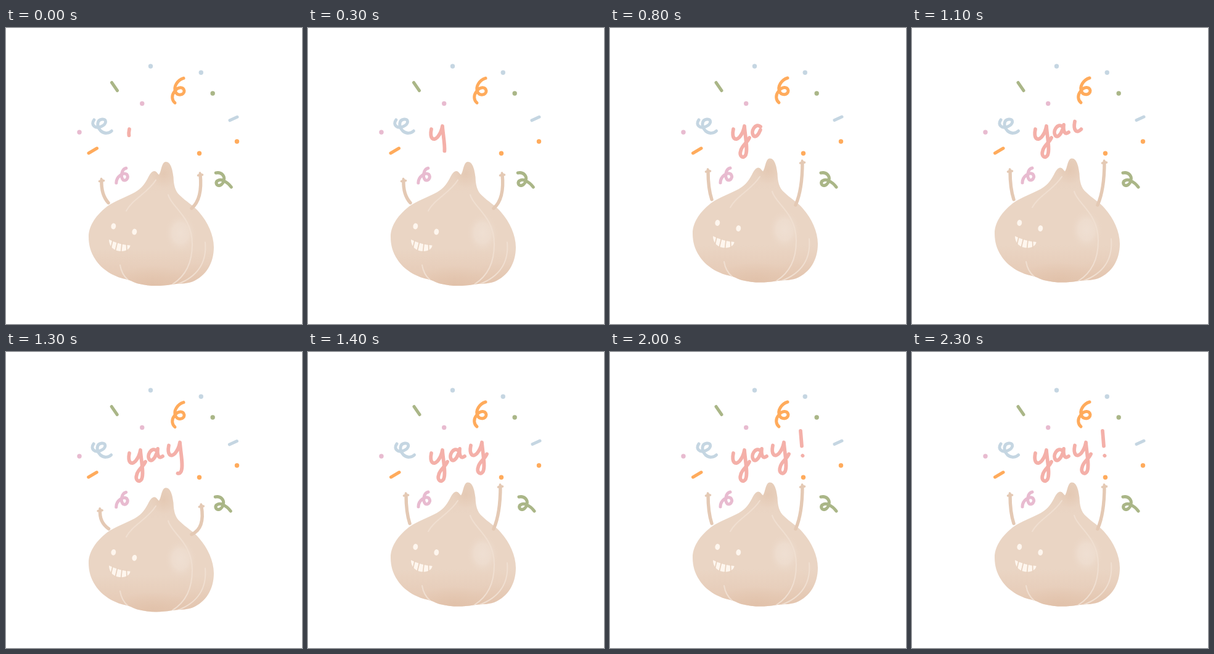
Write an HTML page that moves like this. It is 480 by 480 pixels and loops after 2.4 s.

```html
<!DOCTYPE html>
<html lang="en">
<head>
<meta charset="utf-8">
<title>Yay!</title>
<style>
html, body { margin: 0; width: 100%; height: 100%; overflow: hidden; background: #fff; }
svg { display: block; width: 480px; height: 480px; fill: none; stroke-linecap: round; stroke-linejoin: round; }
#confetti path { stroke-width: 5; }
#word path { stroke: #f4b0a9; stroke-width: 5.8; }
#arms path { stroke: #e4c9b4; stroke-width: 5.4; }
#arms .hand { stroke-width: 3.6; }
.vein { stroke: #f0dfd1; stroke-width: 2; }
</style>
</head>
<body>
<svg viewBox="0 0 480 480">
  <defs>
    <linearGradient id="base" x1="0" y1="0" x2="0" y2="1">
      <stop offset="0" stop-color="#e7cfbc"/>
      <stop offset=".25" stop-color="#ead5c4"/>
      <stop offset=".7" stop-color="#ead5c4"/>
      <stop offset="1" stop-color="#e5c8b3"/>
    </linearGradient>
    <radialGradient id="shade">
      <stop offset="0" stop-color="#dfbea5" stop-opacity=".7"/>
      <stop offset="1" stop-color="#dfbea5" stop-opacity="0"/>
    </radialGradient>
    <radialGradient id="glow">
      <stop offset="0" stop-color="#efdfd2"/>
      <stop offset=".5" stop-color="#efdfd2" stop-opacity=".7"/>
      <stop offset="1" stop-color="#ead5c4" stop-opacity="0"/>
    </radialGradient>
    <path id="bulb" d="M240 226.500C244 226.500 245 230 248 232.500C252 228 252 212 259 211.500C267 211 270 224 271.500 236C272 249 274 259 282 266C292 276 304 282 313 293C327 309 337 330 337 350C337 376 324 397 302 406C291 410 279 408.500 268 410.500C250 413.500 232 413.500 214 409C207 407 201 403 193 401.500C175 398 155 386 145 370C137 358 134 346 134 333C134 316 145 300 159 288C171 277 189 271 204 263.500C218 257 224 249 230 238C233 232 236 227 240 226.500Z"/>
    <clipPath id="clip"><use href="#bulb"/></clipPath>
  </defs>
  <g id="confetti"></g>
  <g id="word"></g>
  <g id="body">
    <use href="#bulb" fill="url(#base)"/>
    <g clip-path="url(#clip)">
      <ellipse cx="238" cy="412" rx="70" ry="32" fill="url(#shade)"/>
      <ellipse cx="310" cy="405" rx="50" ry="30" fill="url(#shade)" opacity=".4"/>
      <ellipse cx="256" cy="231" rx="21" ry="23" fill="url(#shade)" opacity=".6"/>
      <ellipse cx="283" cy="327" rx="27" ry="33" fill="url(#glow)"/>
      <path class="vein" d="M243 241C230 262 205 272 195 291"/>
      <path class="vein" d="M263 265C268 285 302 300 302 345C302 382 286 400 270 410"/>
      <path class="vein" d="M323 342C326 375 310 398 278 410"/>
      <path class="vein" d="M185 379C187 391 192 398 198 403"/>
    </g>
    <g fill="#fef6ee">
      <ellipse cx="174.300" cy="316" rx="3.900" ry="4.900" transform="rotate(10 174.300 316)"/>
      <ellipse cx="208.300" cy="325" rx="3.900" ry="4.900" transform="rotate(10 208.300 325)"/>
      <path d="M167 337.500Q184 346 201.500 347C201 353 194 357 186 356.500C175 356 167 349 167 337.500Z"/>
    </g>
    <path d="M173 339L170.500 350M180.500 342L177.500 355M188 344L186.500 358M195.500 345L196 357" stroke="#e8d1be" stroke-width="1.700"/>
  </g>
  <g id="arms"></g>
</svg>
<script>
const $ = id => document.getElementById(id);
const orange = '#ffab5c', blue = '#c5d6e2', green = '#aab687', pink = '#e8bbd0';

function add(parent, tag, attrs) {
  const el = document.createElementNS('http://www.w3.org/2000/svg', tag);
  for (const key in attrs) el.setAttribute(key, attrs[key]);
  return parent.appendChild(el);
}

const move = (el, x, y) => el.setAttribute('transform', `translate(${x} ${y})`);

const dots = [
  [234.5, 62, blue], [316.3, 72.3, blue], [335.2, 106, green], [220.7, 122.5, pink],
  [119, 169, pink], [374.5, 184, orange], [313.5, 203.2, orange]
];
for (const [cx, cy, fill] of dots) add($('confetti'), 'circle', { cx, cy, r: 3.7, fill });

// Path, colour and drift per unit of crouch
const ribbons = [
  ['M172 88.500L181 101.500', green, -.5, 0],
  ['M364 149.500L376 144', blue, -1, .3],
  ['M134.500 203L148 195', orange, -.5, 0],
  ['M288 81C278 84 271 95 275 103C278 110 289 109 289 101.500C288 94 278 95 273 103C268 109 269 117 274 121', orange, 0, .4],
  ['M144 149C138 157 146 164 155 160C165 156 165 147 157 148C148 149 148 160 155 167C161 172 168 171 172.500 167', blue, -1.2, 0],
  ['M195 227C187 229 186 241 190 246C195 249 200 242 196 237C191 233 179 240 179 251', pink, -.2, .3],
  ['M342 235C351 233 357 240 355 247C353 255 346 258 343 253C341 247 349 245 354 247.500C360 250 364 254 367 258', green, -1.7, 0]
].map(([d, stroke, dx, dy]) => ({ el: add($('confetti'), 'path', { d, stroke }), dx, dy }));

// Path, the steps at which drawing starts and ends, and an offset
const y = 'M200 164C197 179 203 184 210 177C215 171 217 165 218 159C219 175 224 197 220 206C216 213 209 208 212 199C214 190 222 187 226 178';
const strokes = [
  [y, -.4, 5, 0, 0],
  ['M244 160C236 153 227 168 233 175C239 179 245 165 246 157C245 168 248 174 254 169', 5, 10, 0, 0],
  [y, 10.3, 14, 64, -12.5],
  ['M309 128L311 152.500', 14, 17, 0, 0],
  ['M312.300 168L312.500 168.200', 17, 18, 0, 0]
].map(([d, from, to, dx, dy]) => {
  const el = add($('word'), 'path', { d, pathLength: 1 });
  move(el, dx, dy);
  return { el, from, to };
});

const makeArm = () => ({
  limb: add($('arms'), 'path', {}),
  hand: add($('arms'), 'path', { class: 'hand', d: 'M-3.500 1.500L3.500 .5M0 0L-.5 -2.500' })
});
const left = makeArm(), right = makeArm();

// From shoulder through bend to wrist
function drawArm({ limb, hand }, sx, sy, bx, by, x, y) {
  limb.setAttribute('d', `M${sx} ${sy}Q${bx} ${by} ${x} ${y}`);
  move(hand, x, y);
}

const crouch = [1, 1.6, 0];

function draw(now) {
  const step = Math.floor(now % 2400 / 100);
  const k = crouch[step % 3];
  move($('body'), 0, 5.5 * k);
  drawArm(left, 165 + k, 278 + 5.5 * k, 159 - 5 * k, 260 + 10 * k, 159 - 4 * k, 231.5 + 15.5 * k);
  drawArm(right, 301, 287 + 5.5 * k, 312 + 7 * k, 262 + 15 * k, 312 + 3 * k, 217.5 + 20 * k);
  for (const { el, dx, dy } of ribbons) move(el, dx * k, dy * k);
  for (const { el, from, to } of strokes) {
    const part = Math.min(1, (step - from) / (to - from));
    el.style.visibility = part > 0 ? 'visible' : 'hidden';
    el.style.strokeDasharray = part < 1 ? `${Math.max(0, part)} 2` : 'none';
  }
}

const start = performance.now();
function tick() {
  draw(performance.now() - start);
  requestAnimationFrame(tick);
}
tick();
</script>
</body>
</html>
```
